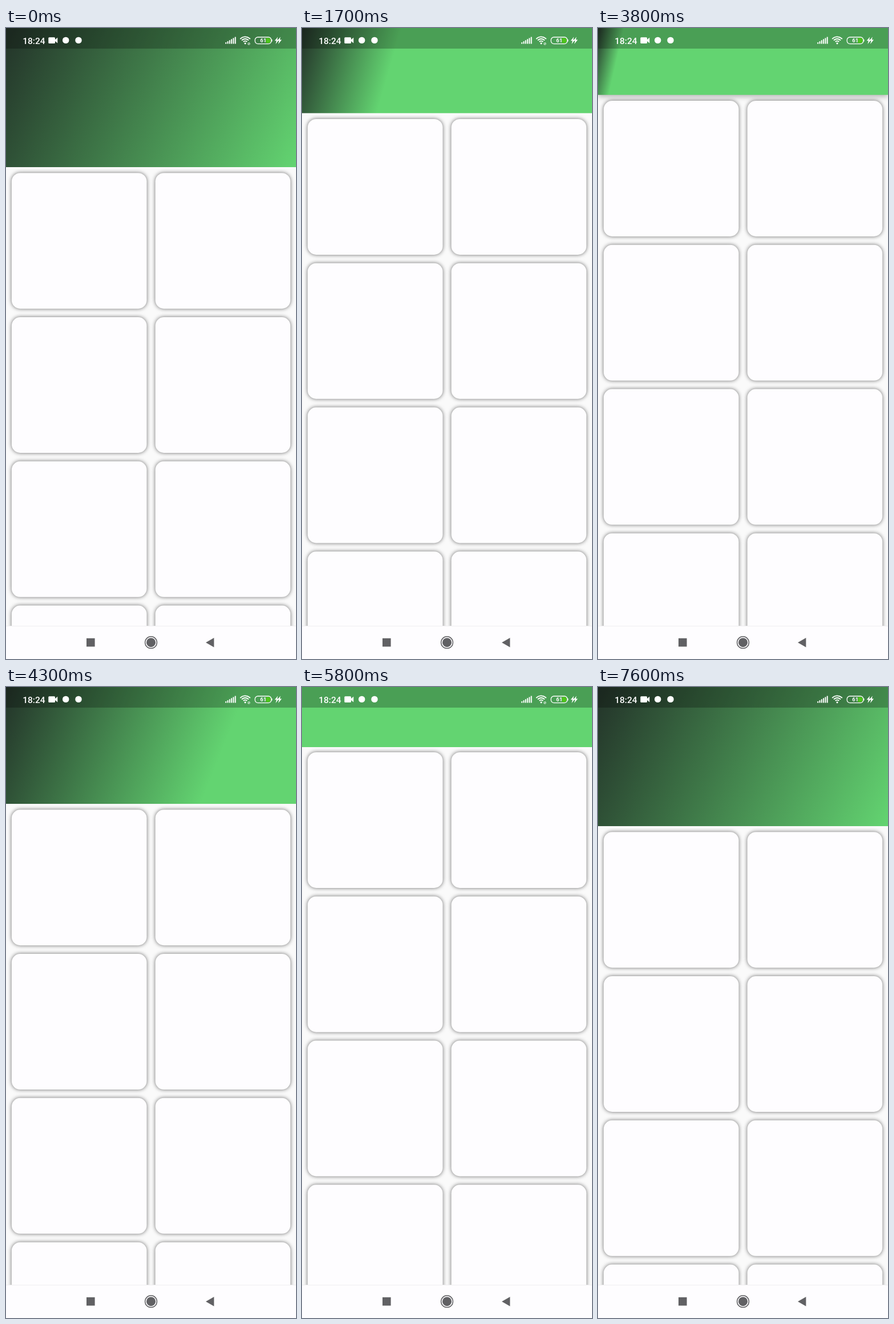
Recreate the animation shown at these times as an HTML page with a canvas. Size 508x1102 px, loop 8600 ms.

```html
<!DOCTYPE html>
<html lang="en">
<head>
<meta charset="utf-8">
<title>Collapsing header</title>
<style>
  html, body { margin: 0; width: 100%; height: 100%; overflow: hidden; background: #fafafa; }
  canvas { display: block; width: 508px; height: 1102px; }
</style>
</head>
<body>
<canvas id="stage" width="508" height="1102"></canvas>
<script>
const ctx = document.getElementById('stage').getContext('2d');
const W = 508, H = 1102, LOOP = 8600, STEP = 100;
const NAV_TOP = 1044, STATUS_H = 36;
const EXPANDED = 243, COLLAPSED = 105, RANGE = EXPANDED - COLLAPSED;
const CARD = 237, PITCH = 251.8;
const DARK = '#233329', GREEN = '#63d471', PAPER = '#fefdff', ICON = '#616164';

// Scroll offset over time: [ms, px]; negative values are overscroll.
const SCROLL = [
  [1200, 0], [1300, 4], [1700, 94.3], [2100, 170], [2500, 192], [3050, 200],
  [3200, 197], [3500, 179], [3800, 126.2], [4200, 52], [4600, 10], [4900, -1.4],
  [5150, -7], [5300, 4], [5800, 139.3], [5950, 172], [6100, 184], [6300, 142],
  [6600, 16], [6700, -20], [6800, -32], [6900, -26], [7100, -6], [7300, 0]
];

function slopeAt(i) {
  const a = SCROLL[i - 1], b = SCROLL[i], c = SCROLL[i + 1];
  if (!a || !c) return 0;
  const left = (b[1] - a[1]) / (b[0] - a[0]);
  const right = (c[1] - b[1]) / (c[0] - b[0]);
  return left * right > 0 ? 2 * left * right / (left + right) : 0;
}

function scrollAt(t) {
  const i = SCROLL.findIndex(key => key[0] > t);
  if (i <= 0) return 0;
  const [t0, y0] = SCROLL[i - 1], [t1, y1] = SCROLL[i];
  const span = t1 - t0, u = (t - t0) / span, v = 1 - u;
  return y0 * (1 + 2 * u) * v * v + y1 * u * u * (3 - 2 * u)
    + span * u * v * (slopeAt(i - 1) * v - slopeAt(i) * u);
}

// The header's elevation follows the collapsed state with a 200 ms transition.
function elevationAt(t) {
  let under = 0;
  for (let d = 0; d < 200; d += 10) if (scrollAt(t - d) > RANGE) under++;
  const u = under / 20;
  return u * u * (3 - 2 * u);
}

function fillRect(color, x, y, w, h) {
  ctx.fillStyle = color;
  ctx.fillRect(x, y, w, h);
}

function roundRect(x, y, w, h, r) {
  ctx.beginPath();
  ctx.roundRect(x, y, w, h, r);
}

function polygon(color, ...points) {
  ctx.fillStyle = color;
  ctx.beginPath();
  points.forEach(([x, y]) => ctx.lineTo(x, y));
  ctx.fill();
}

function disc(color, x, y, r) {
  ctx.fillStyle = color;
  ctx.beginPath();
  ctx.arc(x, y, r, 0, Math.PI * 2);
  ctx.fill();
}

function setShadow(color, blur, offsetY = 0) {
  ctx.shadowColor = color;
  ctx.shadowBlur = blur;
  ctx.shadowOffsetY = offsetY;
}

function drawCards(scroll) {
  ctx.save();
  setShadow('rgba(0,0,0,0.58)', 7);
  ctx.fillStyle = PAPER;
  for (let row = 0; row < 6; row++) {
    const y = 253.2 - scroll + row * PITCH;
    for (const x of [9.9, 261.6]) {
      roundRect(x, y, 236.6, CARD, 15);
      ctx.fill();
    }
  }
  ctx.restore();
}

function drawHeader(scroll, elevation) {
  const h = Math.min(EXPANDED, Math.max(COLLAPSED, EXPANDED - scroll));
  const openness = (h - COLLAPSED) / RANGE;
  let fill = GREEN;
  if (openness > 0) {
    fill = ctx.createLinearGradient(0, 0, W, h);
    fill.addColorStop(0, DARK);
    fill.addColorStop(openness, GREEN);
  }
  ctx.save();
  if (elevation > 0) setShadow(`rgba(0,0,0,${0.4 * elevation})`, 9, 3);
  fillRect(fill, 0, 0, W, h);
  ctx.restore();
  fillRect('rgba(0,0,0,0.25)', 0, 0, W, STATUS_H);
}

function drawWifi(active) {
  ctx.strokeStyle = '#fff';
  ctx.lineWidth = 1.8;
  for (const r of [4.3, 8, 11.7]) {
    ctx.beginPath();
    ctx.arc(419, 27, r, -Math.PI * 0.77, -Math.PI * 0.23);
    ctx.stroke();
  }
  disc('#fff', 419, 26.8, 1.6);
  if (active) {
    ctx.lineWidth = 0.8;
    ctx.beginPath();
    ctx.arc(425.5, 27.5, 1.8, 0, Math.PI * 2);
    ctx.moveTo(424, 29);
    ctx.lineTo(427, 26);
    ctx.stroke();
  }
}

function drawBattery() {
  ctx.fillStyle = '#4fc51c';
  roundRect(455.5, 17.5, 8, 8.8, [0, 4, 4, 0]);
  ctx.fill();
  ctx.strokeStyle = '#fff';
  ctx.lineWidth = 1.3;
  roundRect(436.2, 16, 28.6, 11.6, 5);
  ctx.stroke();
  fillRect('#fff', 465.2, 20, 1.2, 3.6);
  ctx.fillStyle = '#fff';
  ctx.font = '700 9.5px Roboto, sans-serif';
  ctx.fillText('61', 445.2, 25.2);
}

function drawStatus(wifiActive) {
  ctx.fillStyle = '#fff';
  ctx.font = '500 15.5px Roboto, sans-serif';
  ctx.fillText('18:24', 29.2, 27.5);
  roundRect(74.3, 16.3, 11.7, 10.6, 1.5);
  ctx.fill();
  polygon('#fff', [85, 21], [90.3, 16.8], [90.3, 26.4], [85, 22.2]);
  disc('#fff', 104.7, 21.4, 5.7);
  disc('#fff', 127, 21.4, 5.7);
  for (let i = 0; i < 6; i++) {
    const h = 2.5 + i * 1.9;
    fillRect('#fff', 384.2 + i * 3.3, 27.6 - h, 2, h);
  }
  drawWifi(wifiActive);
  drawBattery();
  for (const dx of [0, 4.6]) {
    polygon('#fff', [476.2 + dx, 15.5], [470.7 + dx, 22.3], [473.8 + dx, 22.3],
      [472.4 + dx, 28], [478.4 + dx, 20.5], [475.1 + dx, 20.5]);
  }
}

function drawNav() {
  fillRect(PAPER, 0, NAV_TOP, W, H - NAV_TOP);
  fillRect('#f0eff1', 0, NAV_TOP, W, 1);
  fillRect(ICON, 141, 1065.8, 14.6, 14.6);
  disc(ICON, 254, 1073.2, 8);
  ctx.strokeStyle = ICON;
  ctx.lineWidth = 1.5;
  ctx.beginPath();
  ctx.arc(254, 1073.2, 10.4, 0, Math.PI * 2);
  ctx.stroke();
  polygon(ICON, [350, 1073.2], [364.4, 1065], [364.4, 1081.4]);
}

function draw(t) {
  const scroll = scrollAt(t);
  const wifiActive = !(t >= 3500 && t < 4300) && t < 7600;
  fillRect('#fafafa', 0, 0, W, H);
  drawCards(scroll);
  drawHeader(scroll, elevationAt(t));
  drawStatus(wifiActive);
  drawNav();
}

const start = performance.now();
function tick() {
  const t = (performance.now() - start) % LOOP;
  draw(Math.floor(t / STEP) * STEP);
  requestAnimationFrame(tick);
}
tick();
</script>
</body>
</html>
```
